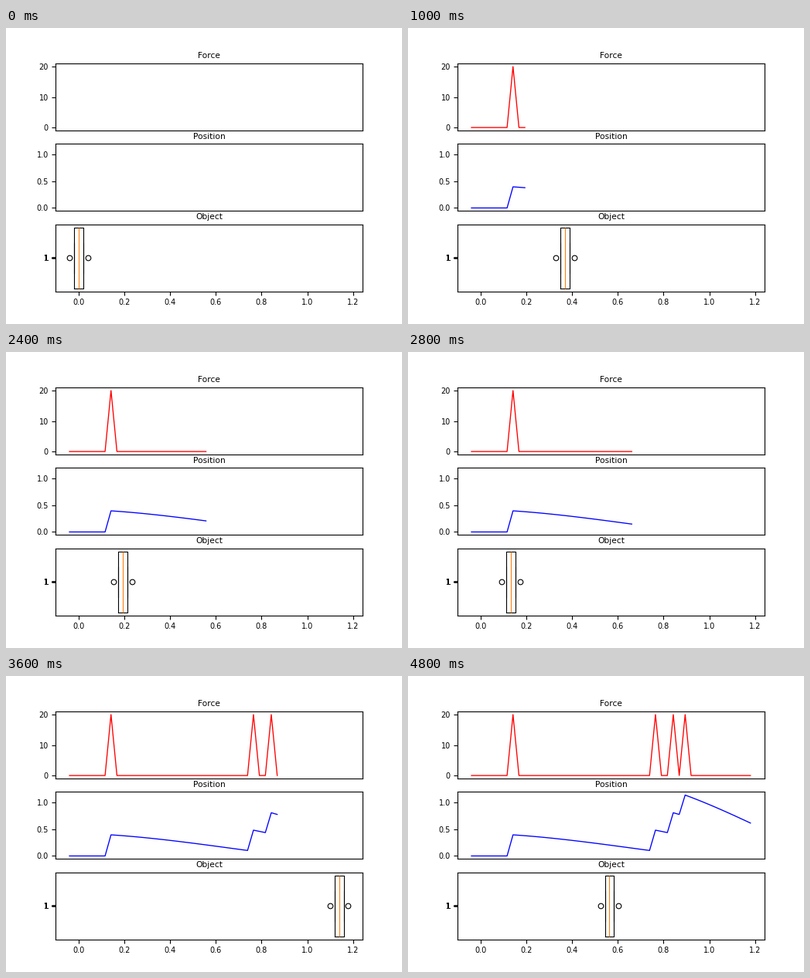
Write a matplotlib script that moves like this. It is 512 by 384 pixels and loops after 5 s.

```python
import numpy as np
import matplotlib.pyplot as plt
from matplotlib.animation import FuncAnimation

FRAMES, INTERVAL = 25, 200
STEPS = 2 * FRAMES - 1
KICKS = (7, 31, 34, 36)
X_MIN, X_MAX = -0.04, 1.18

plt.rcParams.update({
    "font.family": "DejaVu Sans",
    "axes.titlesize": 9.6,
    "axes.linewidth": 1.0,
    "lines.linewidth": 1.2,
    "xtick.labelsize": 8.8, "ytick.labelsize": 8.8,
    "xtick.major.size": 4.8, "ytick.major.size": 4.8,
    "xtick.major.width": 1.0, "ytick.major.width": 1.0,
})


def kick_response(n):
    """Damped swing that starts at a kick (n = 0)."""
    swing = 0.402 * np.exp(-0.01 * n) * np.sin(0.046 * (30.1 - n))
    return np.where(n >= 0, swing, 0.0)


def padded(low, high):
    margin = 0.05 * (high - low)
    return low - margin, high + margin


step = np.arange(STEPS)
time = np.linspace(X_MIN, X_MAX, STEPS - 1)
force = np.where(np.isin(step, KICKS), 20.0, 0.0)
position = sum(kick_response(step - k) for k in KICKS)

fig, axes = plt.subplots(3, 1, figsize=(6.4, 4.8), dpi=80)
force_ax, position_ax, object_ax = axes
for ax, title in zip(axes, ("Force", "Position", "Object")):
    ax.set_title(title)

force_ax.set_yticks([0, 10, 20])
position_ax.set_yticks([0, 0.5, 1])
# Stacked identical ticks give the heavy look of the single label.
object_ax.set_yticks([1] * FRAMES, ["1"] * FRAMES)
force_ax.set_xticks([])
position_ax.set_xticks([])
object_ax.set_xticks(np.arange(0, 1.3, 0.2))

for ax, y_range in zip(axes, ((0, 20), (0, 1.14), (0.925, 1.075))):
    ax.set_xlim(padded(X_MIN, X_MAX))
    ax.set_ylim(padded(*y_range))

force_line, = force_ax.plot([], [], color="red")
position_line, = position_ax.plot([], [], color="blue")
box_artists = []


def draw_object(x):
    while box_artists:
        box_artists.pop().remove()
    stats = dict(med=x, q1=x - 0.02, q3=x + 0.02,
                 whislo=x - 0.02, whishi=x + 0.02,
                 fliers=[x - 0.04, x + 0.04])
    parts = object_ax.bxp([stats], positions=[1], widths=0.15,
                          vert=False, manage_ticks=False)
    for group in parts.values():
        box_artists.extend(group)


def update(frame):
    n = 2 * frame
    force_line.set_data(time[:n], force[:n])
    position_line.set_data(time[:n], position[:n])
    draw_object(position[n])
    return [force_line, position_line, *box_artists]


anim = FuncAnimation(fig, update, frames=FRAMES, interval=INTERVAL,
                     repeat=True, repeat_delay=0, blit=False)
plt.show()
```
